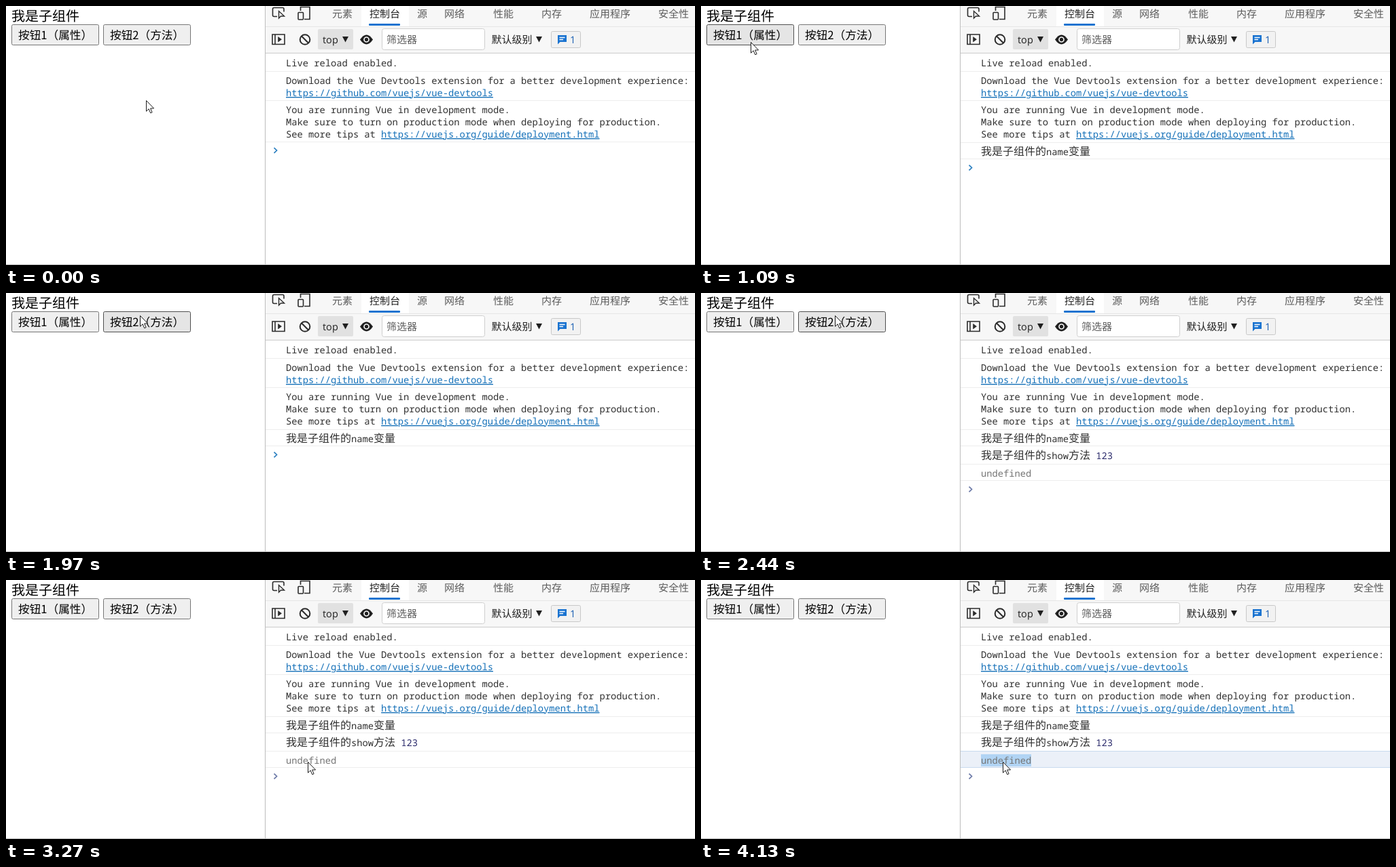
Recreate the animation shown at these times as an HTML page. Size 1014 by 382 pixels, loop 5200 ms.

```html
<!DOCTYPE html>
<html lang="zh-CN">
<head>
<meta charset="utf-8">
<title>Console demo</title>
<style>
  html, body { margin: 0; width: 100%; height: 100%; overflow: hidden; background: #fff; }
  svg { display: block; width: 100vw; height: 100vh; }
  text { font: 15px "Noto Sans CJK SC", sans-serif; fill: #5c5c5c; white-space: pre; text-rendering: geometricPrecision; }
  .page text { font-size: 16.67px; fill: #000; }
  .page .title { font-size: 20px; }
  .dark { fill: #202020; }
  .ui { font-family: "Open Sans", sans-serif; }
  .log text { font: 13.745px "Noto Sans Mono", monospace; fill: #303030; }
  .log .cjk { font: 16px "Noto Sans CJK SC", sans-serif; }
  .log .link { fill: #1470b8; text-decoration: underline; }
  .log .num { fill: #2c2c6c; }
  .log .undef { fill: #757575; }
  .rule { stroke: #ededed; }
  .icon { fill: none; stroke: #2b2b2b; stroke-width: 1.6; }
</style>
</head>
<body>
<svg viewBox="0 0 1014 382" preserveAspectRatio="none">
  <g class="page">
    <text class="title" x="8" y="22">我是子组件</text>
    <rect class="button" x="8.5" y="27.5" width="128" height="30" rx="2"/>
    <text x="18" y="49">按钮1（属性）</text>
    <rect class="button" x="143.5" y="27.5" width="128" height="30" rx="2"/>
    <text x="153" y="49">按钮2（方法）</text>
  </g>

  <path d="M382 0h632v69H382z" fill="#f7f7f7"/>
  <path d="M523 0h70v30h-70z" fill="#fff"/>
  <path d="M382 30.5h632" stroke="#e6e6e6"/>
  <path d="M382 69.5h632" stroke="#cbcbcb"/>
  <rect x="534" y="26" width="46" height="3" rx="1" fill="#1a73d0"/>
  <g id="tabs"></g>

  <g class="icon">
    <path d="M399 15.5h-4.500q-2 0-2-2v-9q0-2 2-2h12.500q2 0 2 2v4"/>
    <path d="M401.500 7.500v10.500l3-3h5z" stroke-width="1.400"/>
    <path d="M433.500 7v-5.500h13.500v18h-8"/>
    <rect x="430" y="9.500" width="7.500" height="10.500" rx="1"/>
    <path d="M392 42h18v14.500h-18zM396 42v14.500"/>
    <path d="M400.500 45.500v7.500l5-3.750z" fill="#2b2b2b" stroke-width=".6"/>
    <path d="M434.800 44.300l10.400 10.400" stroke-width="2"/>
    <circle cx="440" cy="49.500" r="7.300" stroke-width="2"/>
  </g>
  <rect x="459" y="34" width="52" height="30" rx="2" fill="#e1e1e1"/>
  <text class="ui dark" x="466" y="54.500" style="font-size:14.500px">top</text>
  <path d="M495 45h9l-4.500 8.500zM780 45h9l-4.500 8.500z" fill="#202020"/>
  <path d="M521 49.500q9.500-14 19 0q-9.500 14-19 0z" fill="#202020"/>
  <circle cx="530.500" cy="49.500" r="3.500" fill="#202020" stroke="#f7f7f7" stroke-width="1.700"/>
  <rect x="553.500" y="33.500" width="151" height="31" rx="3" fill="#fff" stroke="#cfcfcf"/>
  <text x="560" y="55">筛选器</text>
  <text class="dark" x="714.500" y="54.500">默认级别</text>
  <rect x="802.500" y="37.500" width="43" height="24" rx="2" fill="#f2f2f2" stroke="#c8c8c8"/>
  <path d="M812 43h13v10h-9.500l-3.500 3.500z" fill="#1a73d0"/>
  <path d="M814.500 46.500h8M814.500 49.500h5.500" stroke="#fff" stroke-width="1.300"/>
  <text class="ui" x="830" y="55" style="font-size:14.500px;fill:#1a5fb4">1</text>

  <g class="log">
    <path class="rule" d="M382 96.500h632M382 139.500h632"/>
    <path class="rule" id="lastRule" d="M382 200.500h632"/>
    <text x="412" y="89">Live reload enabled.</text>
    <text x="412" y="115">Download the Vue Devtools extension for a better development experience:</text>
    <text class="link" x="412" y="133">https://github.com/vuejs/vue-devtools</text>
    <text x="412" y="158">You are running Vue in development mode.</text>
    <text x="412" y="176">Make sure to turn on production mode when deploying for production.</text>
    <text x="412" y="194">See more tips at <tspan class="link">https://vuejs.org/guide/deployment.html</tspan></text>
    <g id="firstLog">
      <path class="rule" d="M382 225.500h632"/>
      <text x="412" y="219.500"><tspan class="cjk">我是子组件的</tspan>name<tspan class="cjk">变量</tspan></text>
    </g>
    <g id="secondLog">
      <path class="rule" d="M382 252.500h632M382 276.500h632"/>
      <g id="rowHover">
        <path d="M382 252h632v25H382z" fill="#ebf0f8"/>
        <path d="M382 252.500h632M382 276.500h632" stroke="#c8daee"/>
      </g>
      <path id="selection" d="M412 257h74v18h-74z" fill="#b1d4f4"/>
      <text x="412" y="245"><tspan class="cjk">我是子组件的</tspan>show<tspan class="cjk">方法</tspan> <tspan class="num">123</tspan></text>
      <text class="undef" x="412" y="271">undefined</text>
    </g>
    <path id="prompt" d="M394.500-3.800l4 3.800-4 3.800" fill="none" stroke-width="1.700"/>
  </g>

  <path d="M381.500 0v382M0 381.500h1014" stroke="#bdbdbd"/>
  <circle id="press" r="15" fill="#f8f460" style="mix-blend-mode:multiply"/>
  <path id="cursor" d="M.5.5v15.800l3.600-3.500 2.600 6 2.400-1-2.500-5.800h5z" fill="#fff" stroke="#1c1c1c" stroke-linejoin="round"/>
</svg>
<script>
const LOOP = 5200;
const START = [206, 139];
// Cursor moves: first step, last step, number of steps, end point, eased or linear
const MOVES = [
  [70, 540, 8, [75, 66], true],
  [620, 690, 2, [72, 57]],
  [755, 820, 2, [73, 53]],
  [1350, 1550, 4, [74, 53]],
  [1620, 1830, 4, [196, 33], true],
  [1900, 1970, 2, [197, 33]],
  [2710, 3210, 8, [442, 265], true],
  [3270, 3270, 1, [444, 268]]
];
const CLICKS = [[960, 1090], [2240, 2370], [3540, 3610], [3740, 3810], [4000, 4130]];
const TABS = [["元素", 480], ["控制台", 535], ["源", 605], ["网络", 645], ["性能", 717],
  ["内存", 788], ["应用程序", 859], ["安全性", 960]];

const $ = id => document.getElementById(id);
const show = (id, on) => { $(id).style.display = on ? "" : "none"; };
const buttons = document.querySelectorAll(".button");

$("tabs").innerHTML = TABS.map(([label, x], i) =>
  `<text x="${x}" y="16.5"${i === 1 ? ' class="dark"' : ""}>${label}</text>`).join("");

function cursorAt(t) {
  let pos = START;
  for (const [first, last, steps, end, eased] of MOVES) {
    if (t < first) break;
    const gap = (last - first) / (steps - 1) || 1;
    const step = Math.min(steps, 1 + Math.floor((t - first) / gap + 0.1));
    const p = step / steps;
    const k = eased ? p * p * (3 - 2 * p) : p;
    pos = pos.map((v, i) => v + (end[i] - v) * k);
  }
  return pos.map(Math.round);
}

function paintButton(button, x, y, pressed) {
  const left = +button.getAttribute("x");
  const hover = x >= left && x <= left + 128 && y >= 27 && y <= 58;
  const [fill, stroke] = !hover ? ["#efefef", "#767676"]
    : pressed ? ["#f5f5f5", "#8d8d8d"] : ["#e5e5e5", "#4f4f4f"];
  button.setAttribute("fill", fill);
  button.setAttribute("stroke", stroke);
}

function draw(t) {
  const [x, y] = cursorAt(t);
  const pressed = CLICKS.some(([down, up]) => t >= down && t < up);
  const logs = (t >= 1090) + (t >= 2370);

  $("cursor").setAttribute("transform", `translate(${x} ${y})`);
  $("press").setAttribute("transform", `translate(${x} ${y})`);
  show("press", pressed);
  buttons.forEach(b => paintButton(b, x, y, pressed));

  show("firstLog", logs > 0);
  show("secondLog", logs > 1);
  show("rowHover", t >= 3540);
  show("selection", t >= 3740);
  $("lastRule").setAttribute("transform", `translate(0 ${logs ? 1 : 0})`);
  $("prompt").setAttribute("transform", `translate(0 ${[213, 238.5, 289.5][logs]})`);
  $("prompt").setAttribute("stroke", logs > 1 ? "#6a78a6" : "#2a7fc0");
}

function frame() {
  draw(performance.now() % LOOP);
  requestAnimationFrame(frame);
}
frame();
</script>
</body>
</html>
```
